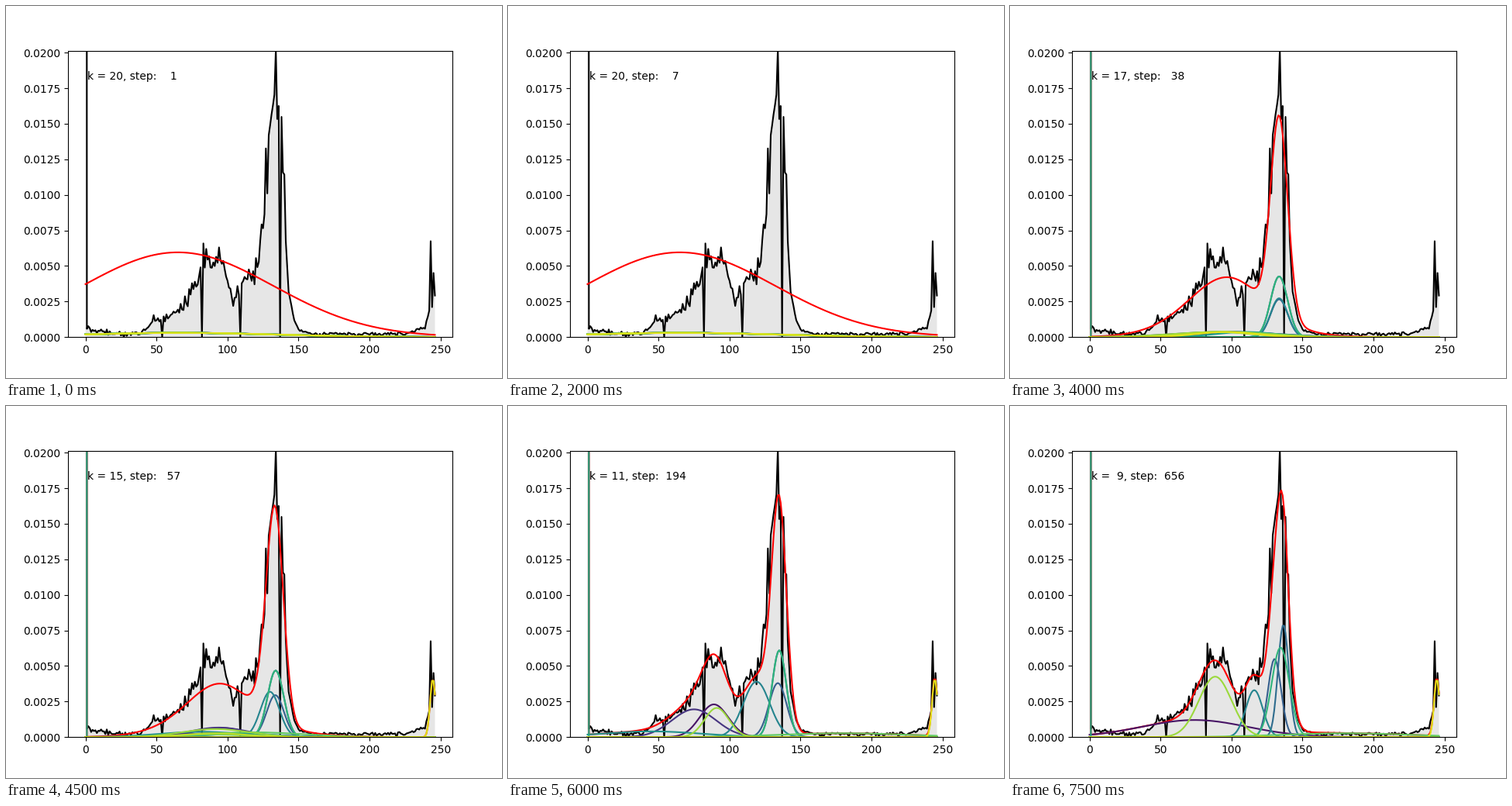
These frames come from a looping animation (640x480 px, 8000 ms). A matplotlib script:

```python
import numpy as np
import matplotlib.pyplot as plt
from matplotlib.animation import FuncAnimation

FRAMES, INTERVAL = 16, 500
UNIT = 1e-4
TOP = 0.02014
N = 20
rng = np.random.default_rng(4)
x = np.arange(247)


def histogram():
    """Grey-level histogram: noisy envelope with regularly spaced gaps."""
    knots = [(1, 6), (10, 4), (20, 2.7), (39, 2.5), (48, 12), (60, 14),
             (72, 25), (79, 46), (86, 58), (94, 56), (100, 40), (104, 21),
             (107, 34), (113, 41), (119, 45), (123, 55), (126, 86),
             (127, 132), (128, 100), (129, 142), (133, 170), (134, 202),
             (135, 154), (136, 163), (138, 155), (139, 115), (140, 115),
             (141, 67), (143, 32), (147, 12), (150, 5), (160, 2.2),
             (225, 2.2), (239, 7), (242, 18), (243, 67), (244, 21),
             (245, 45), (246, 28.5)]
    h = np.interp(x, *zip(*knots))
    rough = np.where(x < 126, 0.09, 0)
    h = np.maximum(h + rng.normal(0, 1, x.size) * (0.6 + rough * h), 0.4)
    h[np.round(27.4 * np.arange(1, 9) - 0.4).astype(int)] = 0
    h[0] = 1 / UNIT - h[1:].sum()
    return h * UNIT


hist = histogram()

# Surviving components: (mean, sigma, height) once settled, then at the end
PEAK = {
    6: [(134, 6.2, 38), (130.3, 4.6, 55)],
    7: [(135, 5, 61), (136.5, 3.8, 79)],
    9: [(119, 9.3, 39), (116, 6, 33)],
    13: [(135, 5, 61), (134.5, 6.2, 63)],
}
SETTLED = PEAK | {
    1: [(89, 10, 23), (74, 37, 12)],
    3: [(75, 15.5, 19.5)],
    10: [(45, 35, 4)],
    12: [(0, 0.15, 4300)],
    15: [(180, 45, 2.7)],
    17: [(91, 8.5, 20.5), (88.5, 11.5, 42.5)],
    19: [(244.5, 1.9, 41)],
}
BRIEF = (3, 10)             # gone by the end
ARRIVAL = {12: 7, 19: 9}    # narrow spikes lock in early
losers = [c for c in range(N) if c not in SETTLED]


def track(c):
    """Keys of one component as time, mean, log sigma and mass."""
    start = (65 + rng.normal(0, 2), 67, 2.98)
    spread = (28, 50, 4.7) if c in (10, 12) else (62 + rng.normal(0, 6), 65, 2.95)
    hump = (97 + rng.normal(0, 5), 20 * 2 ** rng.random(), 3.6)
    keys = {0: start, 4: start, 6: spread}
    if c in PEAK:
        keys[8] = (133.5, 6, 0.7 * PEAK[c][0][2])
    elif ARRIVAL.get(c, 12) > 8:
        keys[8] = hump
    if c in SETTLED:
        first, last = SETTLED[c][0], SETTLED[c][-1]
        keys[ARRIVAL.get(c, 12)] = keys[12] = first
        keys[15] = (*last[:2], 0) if c in BRIEF else last
    else:
        leave = 8 + 2 * (losers.index(c) % 3)
        keys[leave] = (*hump[:2], 0)
    return np.array([(t, m, np.log(s), h * s)
                     for t, (m, s, h) in sorted(keys.items())]).T


tracks = [track(c) for c in range(N)]


def component(c, i):
    t, *params = tracks[c]
    mean, log_sigma, mass = (np.interp(i, t, p) for p in params)
    sigma = np.exp(log_sigma)
    return UNIT * mass / sigma * np.exp(-0.5 * ((x - mean) / sigma) ** 2)


fig, ax = plt.subplots(figsize=(6.4, 4.8), dpi=100)
ax.fill_between(x, hist, color="0.9", lw=0)
ax.plot(x, hist, color="black")
total, = ax.plot(x, 0 * x, color="red")
curves = [ax.plot(x, 0 * x, color=plt.cm.viridis(c / N))[0] for c in range(N)]
label = ax.text(0.05, 0.9, "", transform=ax.transAxes)
ax.set_ylim(0, TOP)


def update(i):
    parts = [component(c, i) for c in range(N)]
    total.set_ydata(sum(parts))
    for curve, y in zip(curves, parts):
        curve.set_ydata(y)
        curve.set_visible(y.max() > 0)
    k = int(np.interp(i, [6, 8, 10, 12, 15], [20, 17, 14, 11, 9]))
    label.set_text(f"k = {k:2d}, step: {int(1.5 ** (i + 1)):4d}")
    return [total, label, *curves]


anim = FuncAnimation(fig, update, frames=FRAMES, interval=INTERVAL,
                     repeat=True, repeat_delay=0)
plt.show()
```
